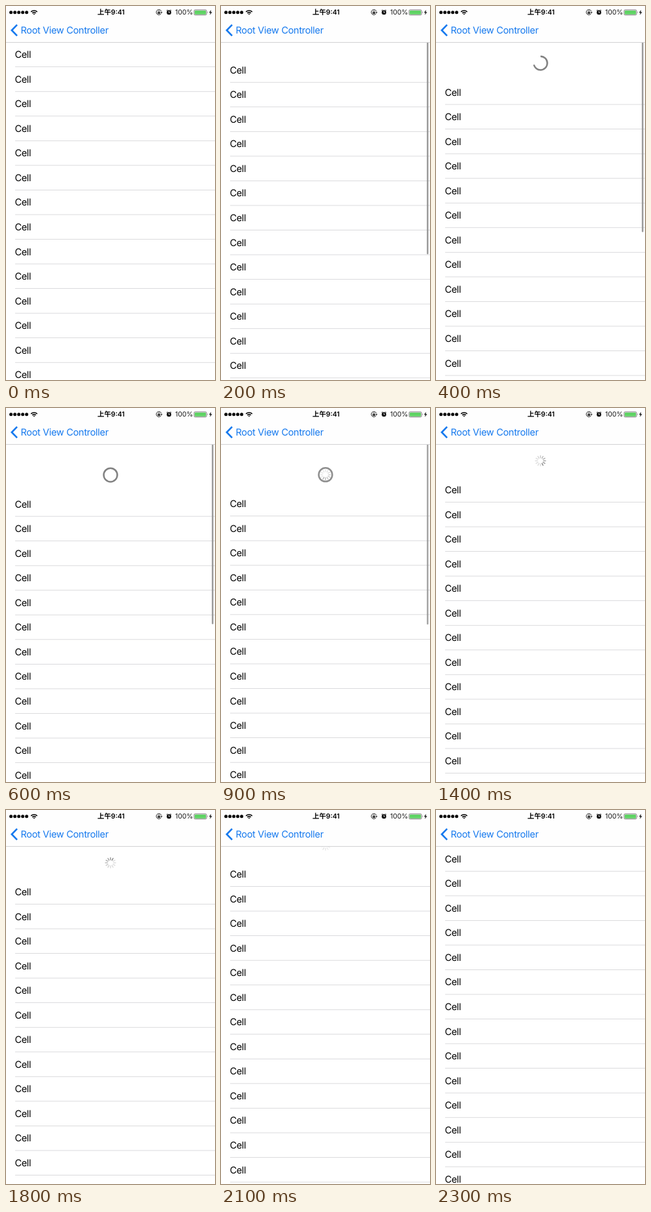
These frames come from a looping animation (320x570 px, 2400 ms). An HTML page:

```html
<!DOCTYPE html>
<html lang="en">
<head>
<meta charset="utf-8">
<title>Pull to refresh</title>
<style>
  html, body { margin: 0; width: 100%; height: 100%; overflow: hidden; background: #fff; }
  svg { display: block; width: 100vw; height: 100vh; }
  text { font-family: Inter, "Noto Sans CJK SC", "Noto Sans CJK", sans-serif; text-rendering: geometricPrecision; }
  .body { font-size: 14.5px; letter-spacing: -.021em; }
  .status { font-size: 10.4px; }
</style>
</head>
<body>
<svg viewBox="0 0 320 570">
  <rect width="320" height="570" fill="#fff"/>
  <g id="rows" class="body"></g>
  <g id="header" fill="none">
    <circle id="ring" r="10.4" stroke="#828282" stroke-width="2.5" pathLength="100" transform="rotate(-90)"/>
    <g id="spinner" stroke="#777" stroke-width="1.5" stroke-linecap="round"></g>
  </g>
  <rect id="bar" x="315.2" y="55" width="2.3" rx="1.1" fill="#949494"/>

  <rect width="320" height="55" fill="#fefefe"/>
  <rect y="55" width="320" height="1" fill="#d2d2d4"/>
  <path d="M17 28.7 8.8 37l8.2 8.3" fill="none" stroke="#1579ee" stroke-width="2.6"/>
  <text class="body" x="22.5" y="42.2" fill="#1579ee">Root View Controller</text>

  <g id="dots"></g>
  <g fill="none" stroke="#000" stroke-width="1.5">
    <path d="M38.2 8.9a6.8 6.8 0 0 1 9.6 0M40.2 11a4 4 0 0 1 5.6 0"/>
    <path d="M43 13.6l-1.5-1.5a2.2 2.2 0 0 1 3 0z" fill="#000" stroke="none"/>
  </g>
  <text class="status" x="140" y="13.4" font-weight="600">上午9:41</text>
  <g fill="none" stroke="#222" stroke-width="1">
    <path d="M237.8 8a4 4 0 1 0-.2 3.4"/>
    <path d="M236.4 9h3.2l-1.6 2.2z" fill="#222" stroke="none"/>
    <path d="M232.9 9.4v-1a1.2 1.2 0 0 1 2.4 0v1" stroke-width=".8"/>
    <rect x="232.2" y="9.2" width="3.8" height="2.7" fill="#222" stroke="none"/>
  </g>
  <circle cx="249.5" cy="9.8" r="3.5" fill="#111"/>
  <path d="M246 7l1.4-1.2M253 7l-1.4-1.2" stroke="#111"/>
  <path d="M249.5 7.8v2.2h1.6" fill="none" stroke="#fff" stroke-width=".8"/>
  <text class="status" x="259" y="13.4" fill="#111">100%</text>
  <rect x="288" y="5.9" width="19" height="7.8" rx="1.5" fill="#fff" stroke="#555" stroke-width=".8"/>
  <rect x="289" y="6.9" width="17" height="5.8" rx=".6" fill="#5fd364"/>
  <path d="M308 8.3q1.2 1.5 0 3z" fill="#555"/>
  <path d="M314.2 5.8l-3.4 4.4h2.1l-.9 3.6 3.6-4.6h-2.2z" fill="#111"/>
</svg>
<script>
const LOOP = 2400, STEP = 100;
const ROW = 320 / 375 * 44, ROW_COUNT = 14;
const PEAK = 72.4, REST = 50.8;
const $ = id => document.getElementById(id);
const clamp = v => Math.max(0, Math.min(1, v));

function add(parent, tag, attrs, text = "") {
  const el = document.createElementNS("http://www.w3.org/2000/svg", tag);
  for (const key in attrs) el.setAttribute(key, attrs[key]);
  el.textContent = text;
  parent.append(el);
  return el;
}

for (let i = 0; i < ROW_COUNT; i++) {
  const y = i * ROW;
  add($("rows"), "text", { x: 13.4, y: 79.2 + y }, "Cell");
  add($("rows"), "rect", { x: 14, y: 92.3 + y, width: 306, height: .8, fill: "#d2d2d5" });
}
const spokes = Array.from({ length: 12 }, (_, i) =>
  add($("spinner"), "path", { d: "M0-4.6V-7.8", transform: `rotate(${i * 30})` }));
for (let i = 0; i < 5; i++) add($("dots"), "circle", { cx: 7.6 + i * 6, cy: 9.8, r: 2.5 });

function ease(t, from, to) {
  const p = clamp((t - from) / (to - from));
  return p * p * (3 - 2 * p);
}

// Drag down, settle at the loading height, then slide back.
function pullAt(t) {
  const drag = PEAK * Math.sin(clamp(t / 600) * Math.PI / 2) ** 1.62;
  return drag - (PEAK - REST) * ease(t, 880, 1120) - REST * ease(t, 1850, 2330);
}

function render(time) {
  const step = Math.floor(time % LOOP / STEP), t = step * STEP;
  const pull = pullAt(t);
  const dragging = 1 - ease(t, 850, 1100);

  $("rows").setAttribute("transform", `translate(0 ${pull})`);
  $("header").setAttribute("transform", `translate(160 ${29.7 + pull})`);

  const progress = t < 600 ? clamp((pull - 26) / 44) : 1;
  $("ring").setAttribute("stroke-dasharray", progress < 1 ? `${progress * 100} 200` : "none");
  $("ring").setAttribute("opacity", progress && dragging);

  $("spinner").setAttribute("opacity", ease(t, 750, 1000) - ease(t, 1850, 2200));
  const head = step * 2 + 1;
  spokes.forEach((spoke, i) => {
    const age = (head - i + 12) % 12;
    spoke.setAttribute("opacity", Math.max(.25, .85 - age * .09));
  });

  $("bar").setAttribute("height", 347 - pull);
  $("bar").setAttribute("opacity", step && dragging);
}

const start = performance.now();
function tick() {
  render(performance.now() - start);
  requestAnimationFrame(tick);
}
tick();
</script>
</body>
</html>
```
